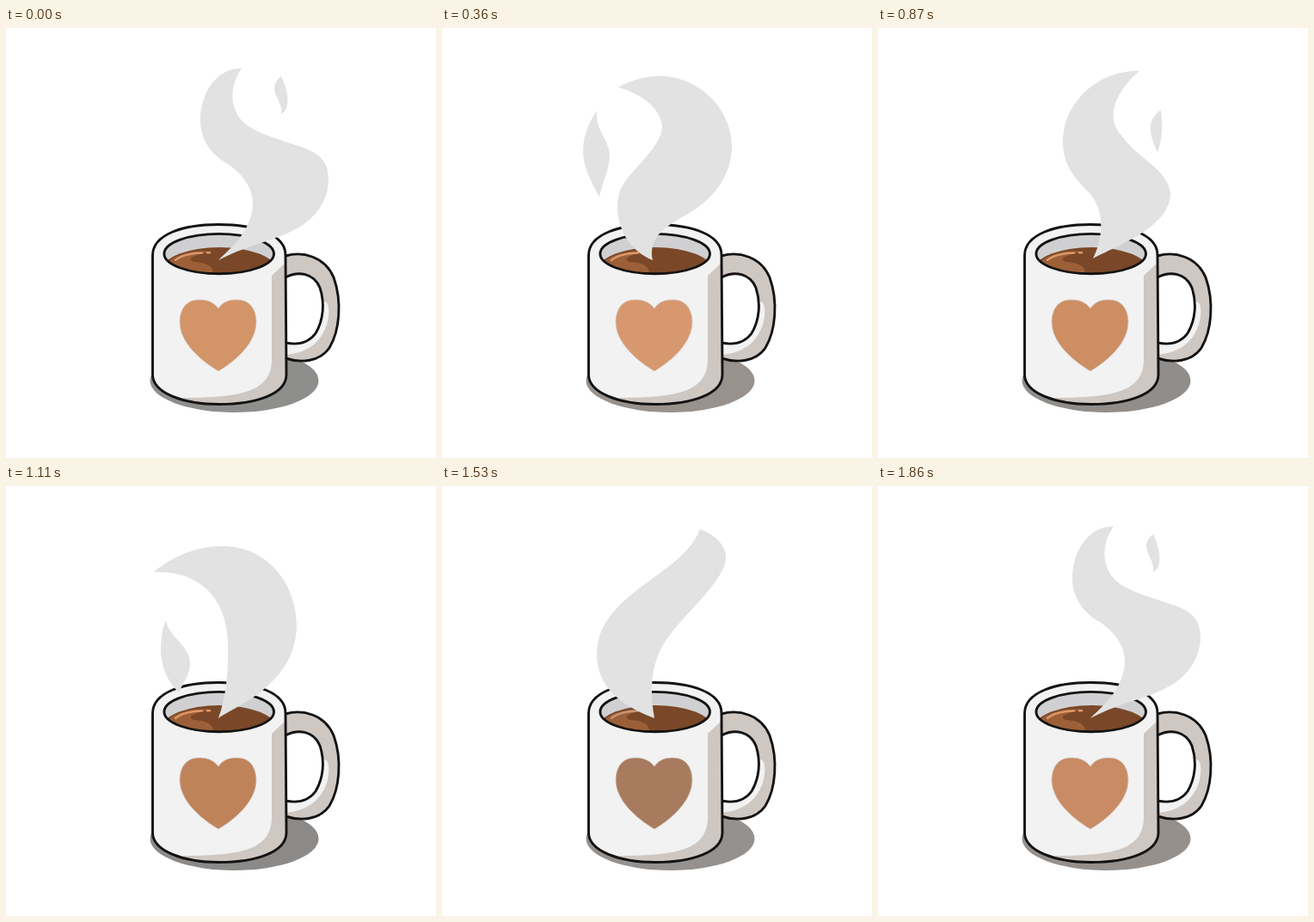
Write an HTML page that moves like this. It is 500 by 500 pixels and loops after 1890 ms.

```html
<!DOCTYPE html>
<html lang="en">
<head>
<meta charset="utf-8">
<title>Steaming mug</title>
<style>
  html, body { margin: 0; width: 100%; height: 100%; overflow: hidden; background: #fff; }
  svg { display: block; width: 100vw; height: 100vh; }

  .line { fill: none; stroke: #141313; stroke-width: 2.9; stroke-linecap: round; stroke-linejoin: round; }
  .light { fill: #f2f2f2; }
  .shade { fill: #cfc7c2; }

  .shadow { animation: shadow 1890ms linear infinite; }
  .heart { animation: heart 1890ms linear infinite; }
  .glint { fill: none; stroke-width: 2.4; stroke-linecap: round; animation: glint 1890ms linear infinite; }

  @keyframes shadow {
    0%, 88.9%, 100% { fill: #8e8e8c; }
    19.05% { fill: #98918c; }
    36.5% { fill: #94908c; }
    58.73% { fill: #8b8a88; }
    71.43% { fill: #9b9490; }
    98.4% { fill: #95908c; }
  }
  @keyframes heart {
    0%, 100% { fill: #d39468; }
    19.05% { fill: #d8986f; }
    36.5% { fill: #d7976c; }
    58.73% { fill: #bf835a; }
    71.43% { fill: #7b6154; }
    88.9% { fill: #cd9066; }
    98.4% { fill: #c98b64; }
  }
  @keyframes glint {
    0%, 58.73%, 88.9%, 100% { stroke: #dd9768; }
    71.43% { stroke: #a39891; }
  }

  /* Ten held steam poses; the cycle runs twice per loop. */
  .steam path {
    fill: #e2e2e2;
    visibility: hidden;
    animation: pose 945ms step-end infinite;
    animation-delay: calc(var(--n) * 94.5ms - 976.5ms);
  }
  @keyframes pose {
    0% { visibility: visible; }
    10%, 100% { visibility: hidden; }
  }
</style>
</head>
<body>
<svg viewBox="0 0 500 500">
  <defs>
    <path id="body" d="M170.5 265C170 239 208 228.500 247 228.500C290 228.500 325 240 325 264L326 403C326 426 290 437.500 248 437.500C205 437.500 170.500 424 170.500 403Z"/>
    <ellipse id="mouth" cx="247.700" cy="262.600" rx="63.800" ry="23.200"/>
    <clipPath id="inBody"><use href="#body"/></clipPath>
    <clipPath id="inMouth"><use href="#mouth"/></clipPath>
  </defs>

  <ellipse class="shadow" cx="265.500" cy="410" rx="98" ry="37"/>

  <g id="handle">
    <path class="shade" d="M325 265C345 259 371 266 381 290C391 318 388 352 376 372C365 388 343 390 325 384Z"/>
    <path class="light" d="M369 318C376 317 377 331 373 345C365 368 348 378 325 380V360Z"/>
    <path fill="#fff" d="M325 290C340 282 358 285 365 302C371 320 369 340 360 355C352 366 340 369 325 366Z"/>
    <path class="line" d="M325 265C345 259 371 266 381 290C391 318 388 352 376 372C365 388 343 390 325 384M325 290C340 282 358 285 365 302C371 320 369 340 360 355C352 366 340 369 325 366"/>
  </g>

  <g id="mug">
    <use href="#body" class="light"/>
    <path class="shade" clip-path="url(#inBody)" d="M327 271L309 288V385C309 425 270 430 200 430V442H330Z"/>
    <use href="#body" class="line"/>
    <path class="heart" stroke="#d6cbc4" stroke-width=".8" d="M247 326C240 317 232 316 224 316C209 316 202 328 202 342C202 365 225 386 247 399C269 386 291 365 291 342C291 328 284 316 269 316C261 316 253 317 247 326Z"/>
    <use href="#mouth" fill="#d0d0d2"/>
    <g clip-path="url(#inMouth)">
      <ellipse cx="248" cy="281" rx="66" ry="26" fill="#7a4828"/>
      <path fill="#9c5f37" d="M186 274C198 262 220 258 240 260C222 262 207 269 219 272C236 273 243 279 240 288H186Z"/>
    </g>
    <path class="glint" d="M197 270C204 264 215 262 228 261.500M234 261.200L237 261.200"/>
    <use href="#mouth" class="line"/>
  </g>

  <g class="steam">
    <path style="--n:0" d="M274 47C246 46 226 75 226 107C226 130 238 146 256 157C283 174 296 200 280 231C272 247 257 260 247 270C285 250 318 247 345 229C364 216 375 197 375 176C375 157 366 146 345 139C325 132 300 125 285 116C262 104 256 72 274 47ZM320 56C325 66 329 80 327 90C326 96 322 99 320 100C322 88 312 80 312 70C312 64 316 59 320 56Z"/>
    <path style="--n:1" d="M196 108C215 90 250 82 285 90C325 100 366 130 366 172C365 225 300 250 247 270C262 250 280 225 282 190C285 150 250 115 196 108Z"/>
    <path style="--n:2" d="M172 100C195 80 225 70 249 70C300 68 338 110 338 163C337 205 310 230 287 246C272 256 257 263 247 270C256 245 259 215 258 182C256 125 220 98 172 100ZM186 156C188 175 214 185 214 206C214 220 206 228 201 240C188 228 180 210 180 190C180 176 182 165 186 156Z"/>
    <path style="--n:3" d="M188 84C210 68 235 62 253 62C300 63 338 102 338 150C337 188 314 212 292 228C272 242 252 252 246 270C236 250 232 225 234 200C238 170 257 160 257 142C254 108 222 88 188 84ZM183 126C183 147 204 158 204 177C204 194 196 204 192 218C180 202 172 186 172 166C172 150 177 136 183 126Z"/>
    <path style="--n:4" d="M205 69C225 58 245 55 257 56C300 58 337 95 337 137C337 170 318 194 297 209C275 225 238 235 245 270C220 260 204 235 204 208C204 185 215 175 232 156C245 141 256 128 256 114C254 92 230 76 205 69ZM180 96C178 120 195 130 195 148C194 168 186 180 183 197C172 175 164 162 164 142C164 125 172 108 180 96Z"/>
    <path style="--n:5" d="M250 52C290 40 340 70 338 110C336 150 290 175 268 200C250 220 244 240 246 270C210 256 190 230 190 200C190 165 225 150 252 128C285 103 285 70 250 52ZM180 68C178 84 190 92 190 104C189 116 184 124 182 134C174 120 170 112 170 98C170 86 174 76 180 68Z"/>
    <path style="--n:6" d="M300 50C325 60 338 78 325 100C305 135 262 165 250 200C242 222 243 248 247 270C205 254 180 232 180 195C180 150 222 125 255 100C280 82 295 65 300 50Z"/>
    <path style="--n:7" d="M344 57C250 62 174 125 174 190C174 230 205 252 247 270C242 245 240 220 243 203C248 160 290 110 344 57Z"/>
    <path style="--n:8" d="M334 53C315 49 290 51 270 60C230 76 204 115 204 158C204 185 220 205 232 220C244 237 250 250 252 266C275 250 306 230 306 204C304 175 272 150 270 122C272 95 305 70 334 53ZM335 134C334 155 332 170 329 190C320 172 320 160 322 154C325 144 330 138 335 134Z"/>
    <path style="--n:9" d="M304 50C258 48 215 85 215 133C215 160 230 176 246 192C262 210 264 240 250 268C285 250 340 230 340 192C338 165 300 150 284 126C262 104 278 72 304 50ZM329 95C331 112 331 128 325 145C319 132 316 122 317 112C319 104 324 99 329 95Z"/>
  </g>
</svg>
</body>
</html>
```
